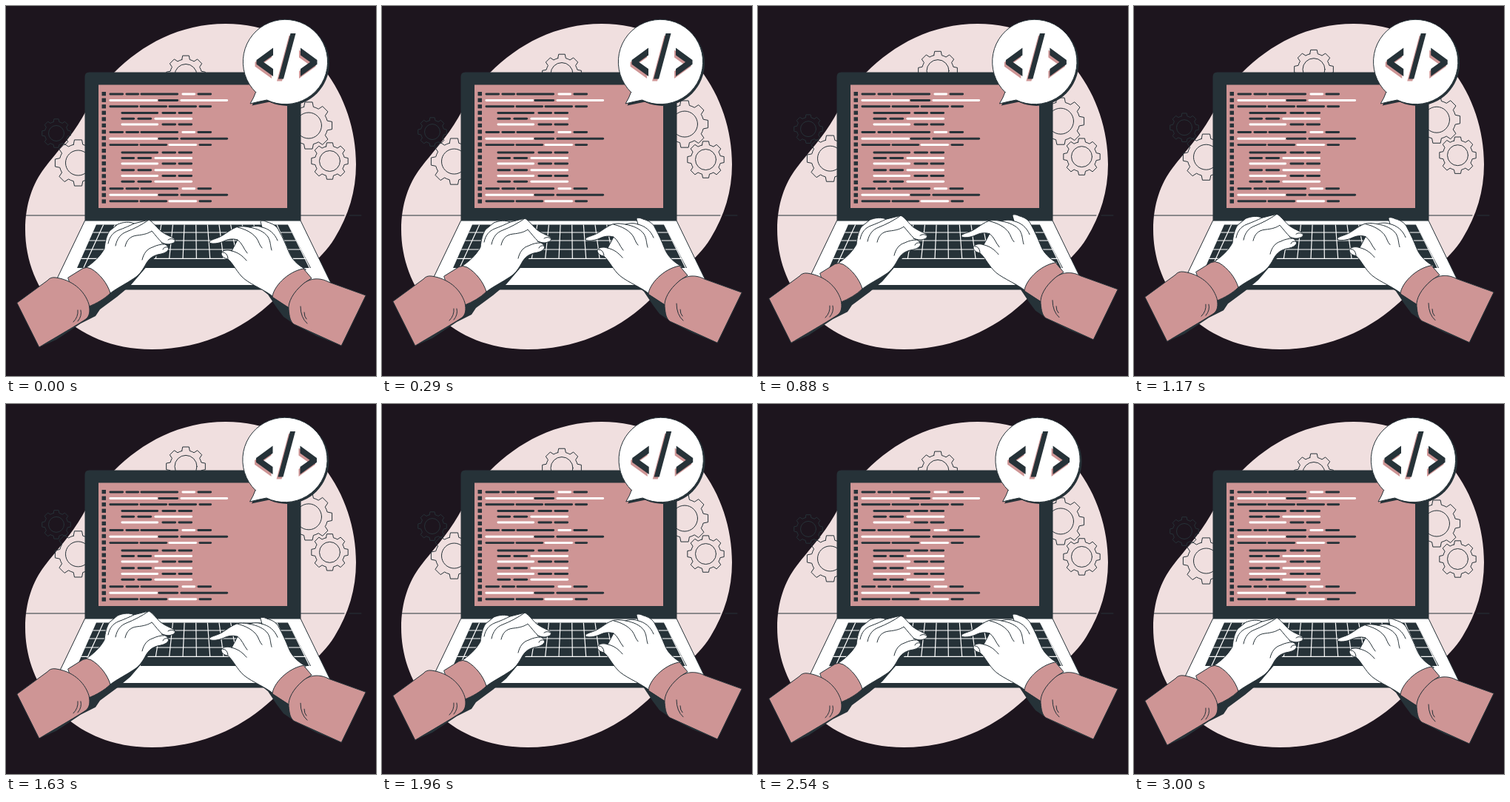
These frames come from a looping animation (500 by 500 pixels, 3040 ms). An HTML page:

```html
<!DOCTYPE html>
<html lang="en">
<head>
<meta charset="utf-8">
<title>Typing code</title>
<style>
  html, body { margin: 0; height: 100%; overflow: hidden; background: #1d151e; }
  svg { display: block; width: 100vw; height: 100vh; }
  .dark { fill: #263238; }
  .pink { fill: #ce9595; }
  .white { fill: #fff; }
  .line { fill: none; }
  .ink, .line { stroke: #263238; stroke-width: 1; stroke-linecap: round; stroke-linejoin: round; }
</style>
</head>
<body>
<svg viewBox="0 0 500 500">
  <defs>
    <clipPath id="keyArea"><path d="M122 295.500H381L412 354H96Z"/></clipPath>
    <g id="tag">
      <path d="M361 56.500V66.500L348 75.800 361 85V95L338.500 78.800V73Z"/>
      <path d="M384.500 37H391.500L375 98.500H368Z"/>
      <path d="M398 56.500V66.500L411 75.800 398 85V95L420.500 78.800V73Z"/>
    </g>
  </defs>

  <path fill="#f0dfdf" d="M297 24C350 24 399 46 430 86C458 122 473 168 473 214C473 250 463 283 444 314
    C425 345 396 361 372 387C330 433 268 464 197 464C90 464 26 386 26 302C26 268 36 240 52 219
    C68 198 88 177 103 151C117 126 130 105 146 90C184 52 235 24 297 24Z"/>
  <path class="line" d="M27 283H457M464 283H480"/>
  <g id="gears" class="line"></g>

  <!-- laptop -->
  <path class="dark" d="M106.500 290V95.500Q106.500 89.500 112.500 89.500H392.500Q398.500 89.500 398.500 95.500V290Z"/>
  <path class="pink" d="M125 106.500H380V273H125Z"/>
  <g id="code" stroke-width="2.900" stroke-linecap="round"></g>
  <path class="white ink" d="M107 290H398L440.500 377.500H65Z"/>
  <path class="dark" d="M65 377H440L437 383.500H68Z"/>
  <g clip-path="url(#keyArea)">
    <path class="dark" d="M90 295H420V354H90Z"/>
    <path id="keyGaps" fill="none" stroke="#fff" stroke-width="1.200"/>
  </g>

  <g id="bubble">
    <g class="dark" transform="translate(2.500 2.500)">
      <circle cx="377.200" cy="75.200" r="57.200"/>
      <path d="M337 115L330 132 354 127Z"/>
    </g>
    <path class="white ink" d="M337.500 116.500A57.200 57.200 0 1 1 352.500 127Q342 129 330 132Q335 124 337.500 116.500Z"/>
    <use href="#tag" class="pink" x="-2" y="3"/>
    <use href="#tag" class="dark"/>
  </g>

  <g id="leftArm">
    <path class="dark" d="M205 336L192 350 168 378 150 393 127 410 121 419 101 429 68 451 45 461 100 400 150 360Z"/>
    <path class="white ink" d="M106 355C118 347 127 339 133 328C134 318 136 310 140 304L151 295
      C158 292 167 291 173 294L193 289C199 292 204 300 209 304C215 309 222 311 227 314C230 317 228 320 224 321
      C219 323 214 321 210 320C217 322 221 326 219 330C216 334 210 335 205 336C198 338 194 341 190 347
      C185 356 181 363 173 368C163 375 150 381 141 388Z"/>
    <path class="line" d="M138 321C140 311 145 306 152 303C160 300 167 297 173 294
      M148 324C150 314 155 308 163 305C173 301 183 296 193 289
      M161 325C163 316 168 311 177 310C187 309 193 307 197 304C203 311 206 315 211 320
      M184 343C186 334 191 328 198 326C204 323 209 322 214 322
      M219 316Q223 313 228 316M212 329Q213 325 219 326"/>
    <path class="pink ink" d="M84 367L104 354.500Q109 352 115 355C127 362 137 375 141 388C133 396 122 402 112 406L90 385Z"/>
    <path class="pink ink" d="M15 401L56 371Q60 366 67 367C89 370 106 384 112 403C114 412 113 419 108 423C98 430 70 446 45 461Z"/>
    <path class="line" d="M97 411Q98 420 91 427M101 411Q103 419 97 426"/>
  </g>

  <g id="rightArm">
    <path class="dark" d="M334 374L354 390 366 408 375 420 391 431 420 446 453 459 430 410 380 370Z"/>
    <path class="white ink" d="M360 392C345 381 327 375 318 365C310 356 306 347 300 342C294 341 291 338 291 334
      C293 330 299 329 305 331L313 316C306 314 300 315 294 318C287 321 279 322 275 320C274 317 279 316 284 314
      C294 311 301 303 311 299C317 297 323 298 329 299C335 297 341 297 346 299L344 292C344 289 349 290 353 292
      C360 294 366 297 369 304C374 313 378 322 382 332C386 342 394 350 405 356Z"/>
    <path class="line" d="M305 331C314 333 320 338 325 344M313 316C319 320 321 328 326 334
      M313 299C325 302 333 307 338 313C342 318 342 323 346 327
      M329 299C340 301 349 305 354 312C358 319 357 324 359 330
      M346 299C355 301 363 307 367 317M293 333Q299 333 300 341"/>
    <path class="pink ink" d="M360 393C361 380 380 359 402 355L413 368C395 378 385 392 383 408Z"/>
    <path class="pink ink" d="M486 391L436 373C425 367 411 367 401 376C388 387 381 400 382 410C383 420 384 426 389 430L453 459Z"/>
    <path class="line" d="M398 406Q398 421 407 429M403 414Q403 420 406 423"/>
  </g>
</svg>
<script>
const $ = id => document.getElementById(id);
const DARK = '#263238', WHITE = '#fff';

function gear([x, y, r, hole]) {
  const body = r * .81;
  const at = (radius, a) => `${x + radius * Math.sin(a)} ${y - radius * Math.cos(a)}`;
  let d = '';
  for (let i = 0; i < 8; i++) {
    const a = i * Math.PI / 4;
    d += i ? `A${body} ${body} 0 0 1 ` : 'M';
    d += `${at(body, a - .25)}L${at(r, a - .16)}L${at(r, a + .16)}L${at(body, a + .25)}`;
  }
  d += `A${body} ${body} 0 0 1 ${at(body, -.25)}Z`;
  return `<path d="${d}"/><circle cx="${x}" cy="${y}" r="${hole}"/>`;
}
$('gears').innerHTML = [
  [243, 93.5, 26.7, 15], [68, 172, 19.5, 10.5], [97.5, 212, 31.5, 17],
  [409, 161.5, 32, 17.5], [437.5, 209.5, 25, 14]
].map(gear).join('');

// Segment layouts; the letters in each row give the colours (d dark, w white).
const layouts = [
  [140, 158, 162, 179, 182, 232, 238, 255, 259, 277],
  [140, 204, 206, 232, 236, 299],
  [140, 178, 181, 217, 220, 257, 261, 277],
  [156, 205, 211, 229, 233, 251],
  [156, 173, 178, 196, 201, 251]
];
const rows = [
  [119, 0, 'dddwd'], [127.5, 1, 'wdw'], [135.8, 2, 'dddd'],
  [144.5, 3, 'ddd'], [152.3, 4, 'ddw'], [160, 3, 'wdd'],
  [170.5, 0, 'dddwd'], [179.2, 1, 'wdd'], [187.6, 2, 'ddwd'],
  [198, 3, 'ddd'], [205.5, 4, 'ddw'], [213, 3, 'wdd'],
  [221.7, 4, 'ddw'], [229.5, 3, 'wdd'], [237.2, 4, 'ddw'],
  [246.8, 0, 'dddwd'], [255.3, 1, 'wdd'], [263.8, 2, 'ddwd']
];
$('code').innerHTML = rows.map(([y, layout, colours], i) => {
  const xs = layouts[layout];
  const bars = [...colours].map((c, k) =>
    `<path d="M${xs[2 * k] + .9} ${y}H${xs[2 * k + 1] - .4}" stroke="${c === 'd' ? DARK : WHITE}"/>`);
  return `<rect class="dark" x="129.500" y="${116 + 8.55 * i}" width="5.500" height="5.300"/>` + bars.join('');
}).join('');

// Key columns fan out from the middle of the keyboard.
const fan = (x, y) => 253 + (x - 253) * (1 + (y - 295) * .0038);
let gaps = [306, 317, 329, 341.3].map(y => `M90 ${y}H420`).join('');
for (let k = -9; k <= 9; k++) {
  const x = 256.7 + 15.6 * k, end = Math.abs(k) < 4 ? 341.3 : 354;
  gaps += `M${x} 295L${fan(x, end)} ${end}`;
}
$('keyGaps').setAttribute('d', gaps);

const LOOP = 3040, CYCLE = 3000;
const sway = [0, -1, 2, -4, 4, -4, 4, -4, 2, -1, 0];
const lift = (t, period) => -10 * (1 - Math.abs(1 - 2 * (t % period) / period));
const move = (id, x, y) => $(id).setAttribute('transform', `translate(${x} ${y})`);

function draw() {
  const t = Math.min(performance.now() % LOOP, CYCLE);
  const p = t / CYCLE * 10, i = Math.min(9, Math.floor(p));
  move('gears', 0, lift(t, CYCLE));
  move('leftArm', 0, lift(t, CYCLE));
  move('rightArm', 0, lift(t, CYCLE / 2));
  move('bubble', sway[i] + (sway[i + 1] - sway[i]) * (p - i), 0);
  requestAnimationFrame(draw);
}
draw();
</script>
</body>
</html>
```
